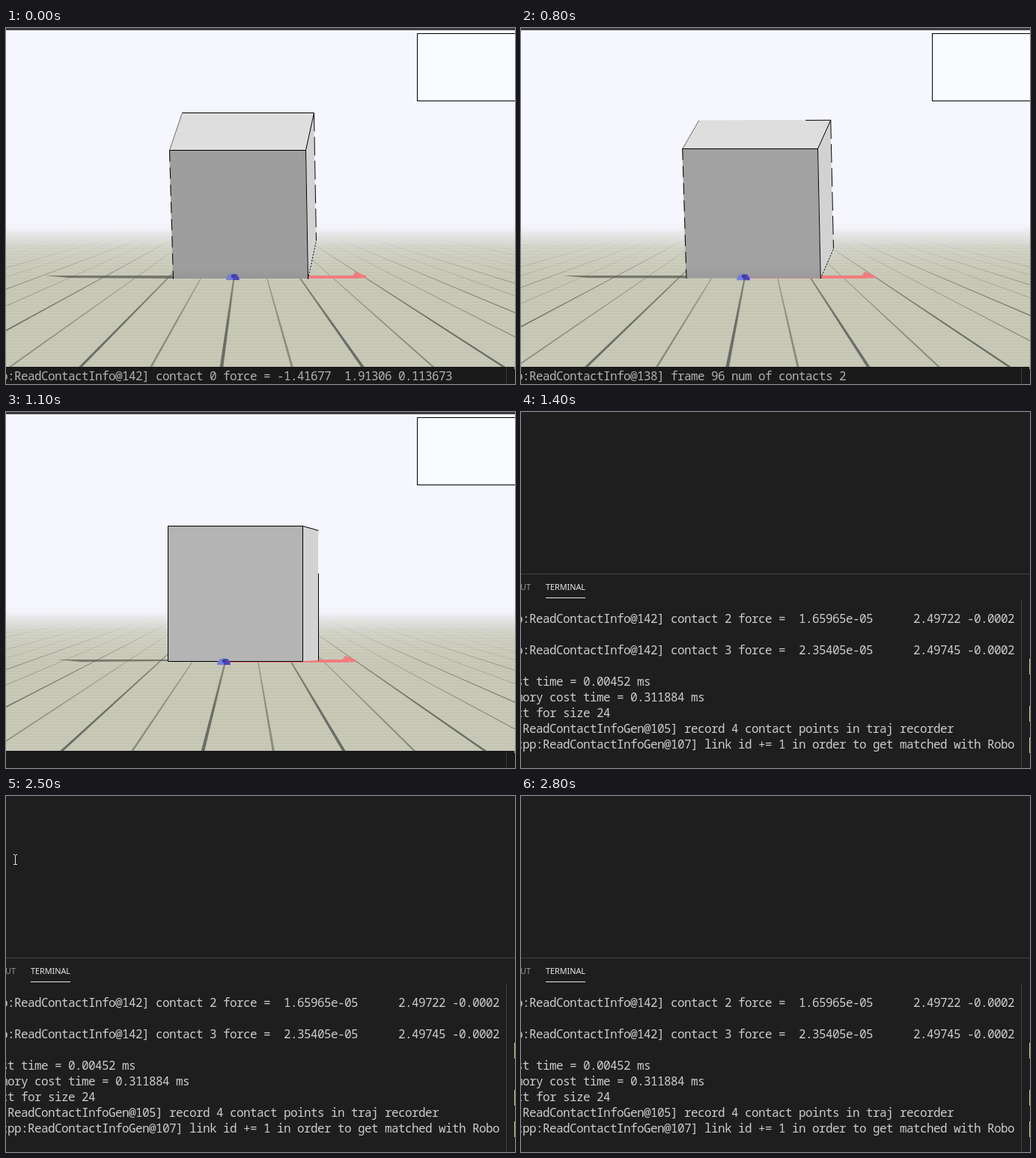
These frames come from a looping animation (680 by 476 pixels, 3.1 s). An HTML page with a canvas:

```html
<!DOCTYPE html>
<html lang="en">
<head>
<meta charset="utf-8">
<title>Cube contact test</title>
<style>
  html, body { margin: 0; width: 100%; height: 100%; overflow: hidden; background: #1e1e1e; }
  canvas { display: block; }
</style>
</head>
<body>
<canvas id="stage" width="680" height="476"></canvas>
<script>
const ctx = document.getElementById('stage').getContext('2d');
const LOOP = 3100, STEP = 100;
const MONO = '16px "Noto Sans Mono", "DejaVu Sans Mono", monospace';
const BACK = '#1e1e1e', TEXT = '#cccccc';
const TEXT_X = -7;
const VANISH = { x: 319, y: 230 };
const FLOOR_END = 453;

// Corners: front tl, tr, br, bl, then back tl, tr, br.
const start = {
  cube: [[218, 163], [400, 163], [403, 335], [223, 335], [235, 113], [411, 113], [414, 284]],
  grid: 288, marker: [303, 333], tip: 482, shadow: 52, grey: 158
};
const tilted = {
  cube: [[215, 164], [396, 164], [401, 335], [222, 335], [237, 112], [412, 111], [417, 282]],
  grid: 280, marker: [299, 333], tip: 476, shadow: 52, grey: 156
};
const rest = {
  cube: [[216, 152], [396, 152], [396, 333], [216, 333], [237, 158], [417, 158], [417, 332]],
  grid: 263, marker: [291, 334], tip: 468, shadow: 68, grey: 180
};

const contactLine = (index, force) => `p:ReadContactInfo@142] contact ${index} force = ${force}`;
const countLine = (frame, count) => `p:ReadContactInfo@138] frame ${frame} num of contacts ${count}`;

const log = [
  [282, contactLine(2, ' 1.65965e-05      2.49722 -0.0002')],
  [324, contactLine(3, ' 2.35405e-05      2.49745 -0.0002')],
  [366, 'st time = 0.00452 ms'],
  [387, 'mory cost time = 0.311884 ms'],
  [408, 'ct for size 24'],
  [429, ':ReadContactInfoGen@105] record 4 contact points in traj recorder'],
  [450, 'cpp:ReadContactInfoGen@107] link id += 1 in order to get matched with Robo']
];

const mix = (a, b, u) => Array.isArray(a) ? a.map((v, i) => mix(v, b[i], u)) : a + (b - a) * u;

function blendPose(a, b, u) {
  const pose = {};
  for (const key in a) pose[key] = mix(a[key], b[key], u);
  return pose;
}

function poseAt(t) {
  if (t < 600) return start;
  const fall = Math.min(1, ((t - 600) / 400) ** 2);
  return blendPose(tilted, rest, fall);
}

function statusAt(t) {
  if (t < 600) return contactLine(0, '-1.41677  1.91306 0.113673');
  if (t < 700) return countLine(88, 2);
  if (t < 800) return countLine(92, 2);
  if (t < 900) return countLine(96, 2);
  if (t < 1000) return countLine(101, 4);
  return '';
}

function rect(color, x, y, w, h) {
  ctx.fillStyle = color;
  ctx.fillRect(x, y, w, h);
}

function shape(color, ...points) {
  ctx.fillStyle = color;
  ctx.beginPath();
  points.forEach(([x, y]) => ctx.lineTo(x, y));
  ctx.fill();
}

function edge(a, b, dash = []) {
  ctx.strokeStyle = '#000';
  ctx.lineWidth = 1;
  ctx.setLineDash(dash);
  ctx.beginPath();
  ctx.moveTo(a[0] + .5, a[1] + .5);
  ctx.lineTo(b[0] + .5, b[1] + .5);
  ctx.stroke();
  ctx.setLineDash([]);
}

function label(text, x, y, font, color, align = 'left') {
  ctx.font = font;
  ctx.fillStyle = color;
  ctx.textAlign = align;
  ctx.fillText(text, x, y);
}

// The terminal sets its glyphs in whole-pixel cells, a little tighter than the font.
function terminalLine(text, y) {
  ctx.letterSpacing = '-0.6px';
  label(text, TEXT_X, y, MONO, TEXT);
  ctx.letterSpacing = '0px';
}

function gradient(y0, y1, stops) {
  const g = ctx.createLinearGradient(0, y0, 0, y1);
  stops.forEach(([at, color]) => g.addColorStop(at, color));
  return g;
}

function drawFloor(gridX) {
  const top = 262;
  rect('#c8c9b7', -80, top, 840, FLOOR_END - top);
  for (let y = 290; y < FLOOR_END; y += 4) rect('rgba(110,110,80,.09)', -80, y, 840, 1);

  const near = (top - VANISH.y) / (FLOOR_END - VANISH.y);
  const fading = (rgb, alpha) => gradient(top, FLOOR_END,
    [[0, `rgba(${rgb},.15)`], [.35, `rgba(${rgb},${alpha * .7})`], [.7, `rgba(${rgb},${alpha})`]]);
  const strong = fading('84,84,82', .78), light = fading('100,100,92', .6);
  for (let k = -44; k <= 44; k++) {
    const even = k % 2 === 0;
    const half = even ? 2.3 : 1.6;
    const x = gridX + 94.2 * k;
    const far = mix(VANISH.x, x, near);
    shape(even ? strong : light,
      [far - half * near, top], [far + half * near, top], [x + half, FLOOR_END], [x - half, FLOOR_END]);
  }
  const haze = alpha => `rgba(246,246,255,${alpha})`;
  rect(gradient(258, 335, [[0, haze(1)], [.13, haze(.9)], [.27, haze(.58)], [.45, haze(.26)], [.7, haze(.1)], [1, haze(0)]]),
    -80, 258, 840, 77);
}

function drawAxes(pose) {
  const [left, bottom] = pose.cube[3];
  const s = pose.shadow;
  shape('rgba(88,88,80,.72)', [s, 331], [left, 331], [left, bottom], [s + 32, 334]);
  const tip = pose.tip;
  rect('#f27c7c', pose.marker[0], 331, tip - pose.marker[0] - 12, 4);
  shape('#f27c7c', [tip - 18, 330], [tip - 15, 326], [tip, 332], [tip - 2, 334], [tip - 18, 335]);
}

function drawCube({ cube, grey }, t) {
  const [ftl, ftr, fbr, fbl, btl, btr, bbr] = cube;
  const settled = t >= 1000;
  shape('#d2d2d2', ftr, btr, bbr, fbr);
  if (btl[1] < ftl[1]) {
    shape('#dedede', ftl, btl, btr, ftr);
    edge(btl, ftl, [1, 1]);
    edge(t < 600 ? btl : mix(btl, btr, .81), btr);
  }
  const tone = v => `rgb(${v},${v},${v})`;
  const face = settled ? tone(grey) : gradient(ftl[1], fbl[1], [[0, tone(grey)], [.91, tone(grey)], [1, tone(grey - 8)]]);
  shape(face, ftl, ftr, fbr, fbl);
  edge(ftl, ftr);
  edge(ftr, btr);
  edge(ftr, fbr);
  if (settled) {
    edge(ftl, fbl);
    edge(fbl, fbr);
    edge(mix(btr, bbr, .33), bbr);
  } else {
    edge(ftl, fbl, [15, 8]);
    edge(btr, bbr, [25, 7]);
    edge(fbr, bbr, [2, 2]);
  }
}

function drawMarker([x, y]) {
  const r = 9, base = y + 4;
  shape('#737de0', [x - r, base], [x - r + 1, y - 1], [x - 4, y - 4], [x + 1, y - 5], [x + 1, base]);
  shape('#5145b5', [x, y - 4], [x + 5, y - 4], [x + r - 1, y], [x + r, base], [x, base]);
  rect('#3d4099', x - 2, y - 3, 5, 4);
}

function drawScene(t) {
  const pose = poseAt(t);
  rect('#f6f6ff', -80, 3, 840, 260);
  drawFloor(pose.grid);
  drawAxes(pose);
  drawCube(pose, t);
  drawMarker(pose.marker);
  rect('#f8fbff', 549, 7, 160, 90);
  ctx.strokeStyle = '#000';
  ctx.lineWidth = 1;
  ctx.strokeRect(549.5, 7.5, 160, 90);
}

function drawPanelEdge() {
  rect('#414141', 668, 251, 1, 225);
  for (const y of [330, 393, 435]) rect('#d8c27a', 679, y, 1, 21);
}

function drawSimulator(t) {
  rect(BACK, 0, 0, 680, 476);
  drawPanelEdge();
  terminalLine(statusAt(t), 471);
  rect('rgba(0,0,0,.13)', 0, FLOOR_END, 680, 23);
  ctx.save();
  ctx.beginPath();
  ctx.rect(0, 0, 680, FLOOR_END);
  ctx.clip();
  drawScene(t);
  ctx.restore();
  rect('#3b3a38', 0, 0, 680, 3);
}

function drawTerminal() {
  rect(BACK, 0, 0, 680, 476);
  rect('#444444', 0, 216, 680, 1);
  const tabFont = '10.8px "Noto Sans", sans-serif';
  label('OUTPUT', 13, 238, tabFont, '#969696', 'right');
  label('TERMINAL', 33, 238, tabFont, '#e7e7e7');
  rect('#e7e7e7', 33, 248, 53, 1);
  log.forEach(([y, line]) => terminalLine(line, y));
  drawPanelEdge();
}

// The simulator window shrinks and fades over the terminal as it closes.
function drawClosingWindow(t) {
  rect(gradient(11, 36, [[0, '#2b2a27'], [1, '#272622']]), 0, 11, 656, 25);
  label('DeepMimic', 318, 27, 'bold 12px "Noto Sans", sans-serif', '#5b5954', 'center');
  [['#454440', 610], ['#454440', 627], ['#743b26', 644]].forEach(([color, x], i) => {
    ctx.fillStyle = color;
    ctx.beginPath();
    ctx.arc(x, 23, 6.5, 0, 2 * Math.PI);
    ctx.fill();
    label(['–', '▫', '×'][i], x, 27, '11px "DejaVu Sans", sans-serif', '#242320', 'center');
  });
  ctx.save();
  ctx.beginPath();
  ctx.rect(0, 36, 656, 380);
  ctx.clip();
  // Lay the terminal back over the scene so that the window fades as one layer.
  const main = ctx.canvas;
  const copy = document.createElement('canvas');
  copy.width = main.width;
  copy.height = main.height;
  copy.getContext('2d').drawImage(main, 0, 0);
  ctx.translate(50, 33);
  ctx.scale(.844, .844);
  drawScene(t);
  ctx.setTransform(1, 0, 0, 1, 0, 0);
  ctx.globalAlpha = .795;
  ctx.drawImage(copy, 0, 0);
  ctx.restore();
}

function drawPointer(t) {
  const k = (t - 2500) / STEP;
  const x = Math.round(12 + 19.5 * k), y = 85 - 39 * k;
  const color = '#e4e4e4';
  rect(color, x, y - 6, 1, 13);
  for (const dy of [-7, 6]) {
    rect(color, x - 2, y + dy, 2, 1);
    rect(color, x + 1, y + dy, 2, 1);
  }
}

function draw(elapsed) {
  const t = Math.floor(elapsed % LOOP / STEP) * STEP;
  if (t < 1300) return drawSimulator(t);
  drawTerminal();
  if (t < 1400) drawClosingWindow(t);
  if (t >= 2500 && t < 2800) drawPointer(t);
}

const began = performance.now();
function tick() {
  draw(performance.now() - began);
  requestAnimationFrame(tick);
}
tick();
</script>
</body>
</html>
```
